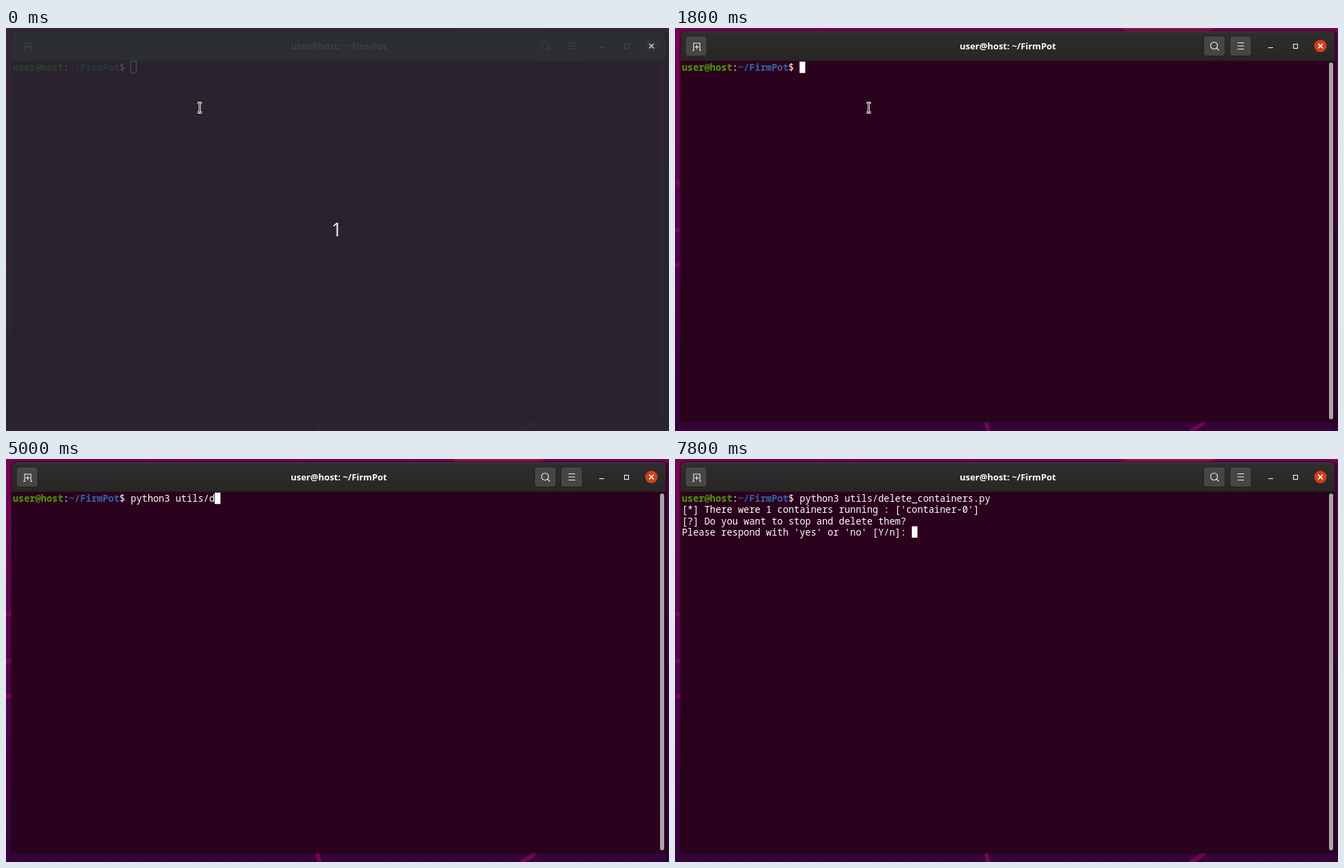
An HTML page for the animation above (8 s loop, 960 by 584 pixels).

```html
<!DOCTYPE html>
<html lang="en">
<head>
<meta charset="utf-8">
<title>Terminal</title>
<style>
html, body { margin: 0; width: 100%; height: 100%; overflow: hidden; background: #3a0440; }
svg { display: block; width: 960px; height: 584px; }
.term { font: 13.545px "Noto Sans Mono", "DejaVu Sans Mono", monospace; fill: #fff; white-space: pre; }
.term .user { fill: #4e9a06; font-weight: bold; }
.term .path { fill: #3465a4; font-weight: bold; }
.title { font: bold 12.9px "Noto Sans", "Open Sans", sans-serif; text-anchor: middle; }
.count { font: 27px "Noto Sans", "Open Sans", sans-serif; text-anchor: middle; fill: #e4e2e6; }
</style>
</head>
<body>
<svg viewBox="0 0 960 584">
  <defs>
    <linearGradient id="desk" x1="0" y1="0" x2="0" y2="1">
      <stop offset="0" stop-color="#72084f"/>
      <stop offset=".5" stop-color="#54044c"/>
      <stop offset="1" stop-color="#340339"/>
    </linearGradient>
    <linearGradient id="bar" x1="0" y1="0" x2="0" y2="1">
      <stop offset="0" stop-color="#302f2d"/>
      <stop offset="1" stop-color="#272624"/>
    </linearGradient>
    <g id="icons" fill="none" stroke="currentColor" stroke-width="1.1">
      <path d="M25 32.5h2v-10.500h9v10.500h2M31.500 24.500v6M28.500 27.500h6"/>
      <circle cx="780.500" cy="25.500" r="5"/>
      <path d="M784 29l3.500 3.500M814.500 21.500h9.500M814.500 26h9.500M814.500 30.500h9.500"/>
      <path d="M859 28.500h7"/>
      <rect x="895.500" y="23.500" width="6" height="6"/>
    </g>
    <path id="cross" d="M931.300 22.800l6.600 6.600M937.900 22.800l-6.600 6.600" stroke-width="1.5"/>
  </defs>

  <rect width="960" height="584" fill="url(#desk)"/>
  <path d="M648 0h133l-8 6h-120z" fill="#8c1452"/>
  <g fill="none" stroke="#86085a" stroke-width="6" opacity=".7">
    <path d="M212 -1l-5 8M0 223l9 3M0 293h9M0 344l9 -1M451 569q0 8 3 16M768 569q-8 9 -22 15"/>
    <path d="M262 -1l-8 8M434 -1l-10 8M587 -1l-2 8M607 -1l-3 8" stroke-width="2"/>
  </g>
  <path d="M8 571V12q0 -8 8 -8H948q8 0 8 8V571z" fill="none" stroke="#100010" stroke-opacity=".3" stroke-width="3"/>
  <rect x="955" width="5" height="584" y="6" fill="#1d0524" opacity=".45"/>

  <g id="blurred"></g>
  <g id="focused"></g>

  <text class="term" x="10" y="62"><tspan class="user">user@host</tspan>:<tspan class="path">~/FirmPot</tspan>$ <tspan id="typed"></tspan></text>
  <g id="output"></g>
  <rect id="cursor" width="8.200" height="16.500"/>

  <g id="countdown">
    <rect width="960" height="584" fill="rgb(40,44,48)" opacity=".81"/>
    <use href="#cross" stroke="#c4c4c4"/>
    <text class="count" x="479" y="301.500">1</text>
  </g>

  <g id="pointer" fill="none">
    <path id="beam" d="M277.500 108.500h2l1 1 1 -1h2M280.500 109v13M277.500 122.500h2l1 -1 1 1h2" stroke="#f4f4f4" stroke-width="3"/>
    <use href="#beam"/>
    <path d="M277.500 108.500h2l1 1 1 -1h2M280.500 109v13M277.500 122.500h2l1 -1 1 1h2" stroke="#111" stroke-width="1"/>
  </g>
</svg>
<script>
const LOOP = 8000, LEFT = 10, TOP = 49, COL = 8.127, ROW = 16.27, PROMPT = 21;
const $ = id => document.getElementById(id);
const command = 'python3 utils/delete_containers.py ';
const lines = [
  "[*] There were 1 containers running : ['container-0']",
  '[?] Do you want to stop and delete them?',
  "Please respond with 'yes' or 'no' [Y/n]: "
];

// [time, characters typed so far]
const keys = [[0, 0], [1900, 1], [2100, 2], [2300, 4], [2500, 5], [2600, 6], [2700, 7],
  [3000, 8], [3300, 9], [3700, 11], [3900, 14], [5000, 15], [5300, 17], [5500, 18], [6000, 35]];
// spans in which the blinking cursor is hidden
const blinks = [[1200, 1800], [4500, 4800], [6100, 6600], [7200, 7800]];
const focus = [[0, 0], [900, 0.6], [1000, 0.95], [1100, 1]];

const at = (track, t) => track.filter(step => step[0] <= t).pop()[1];
const show = (id, on) => $(id).setAttribute('display', on ? 'inline' : 'none');

function chrome(c) {
  const button = x => `<rect x="${x}" y="11.500" width="31" height="29" rx="3.500" fill="${c.button}" stroke="${c.edge}"/>`;
  return `<path d="M9 48V13q0 -8 8 -8H947q8 0 8 8V48z" fill="${c.bar}"/>
    <path d="M15 5.500H949" stroke="${c.shine}"/>
    <rect x="9" y="47" width="946" height="523" fill="${c.back}"/>
    <path d="M9 47.500H955" stroke="${c.line}"/>
    <path d="M8.500 47V570.500H955.500V47" fill="none" stroke="#22091f"/>
    <rect x="947" y="50" width="6" height="517" rx="3" fill="${c.scroll}"/>
    ${[15, 765.5, 803.5].map(button).join('')}
    <use href="#icons" color="${c.icon}"/>
    <circle cx="934.600" cy="26.100" r="9" fill="${c.close}"/>
    <use href="#cross" stroke="#fff"/>
    <text class="title" x="482" y="31" fill="${c.title}">user@host: ~/FirmPot</text>`;
}

$('blurred').innerHTML = chrome({
  bar: '#3c3b39', shine: '#494846', back: '#330225', line: '#292826', scroll: '#3d1231',
  button: '#3d3c3a', edge: '#2c2b29', icon: '#b4b3b0', close: '#5b5a57', title: '#9c9b98'
});
$('focused').innerHTML = chrome({
  bar: 'url(#bar)', shine: '#3c3b39', back: '#2b021e', line: '#1b1a18', scroll: '#aaa3a7',
  button: '#474644', edge: '#21201e', icon: '#f4f4f2', close: '#d04019', title: '#fff'
});
$('output').innerHTML = lines.map((s, i) =>
  `<text class="term" x="${LEFT}" y="${62 + (i + 1) * ROW}">${s}</text>`).join('');

function draw(t) {
  const typed = at(keys, t), done = t >= 7000, active = t >= 900;
  const col = done ? lines[2].length : PROMPT + typed;
  const cursor = $('cursor');
  $('focused').setAttribute('opacity', at(focus, t));
  $('typed').textContent = command.slice(0, typed);
  cursor.setAttribute('x', LEFT + col * COL - (active ? 0.3 : 0.2));
  cursor.setAttribute('y', TOP + (done ? 3 * ROW : 0) - (active ? 0.3 : 0.5));
  cursor.setAttribute('fill', active ? '#fff' : 'none');
  cursor.setAttribute('stroke', active ? 'none' : '#fff');
  show('cursor', !blinks.some(([from, to]) => t >= from && t < to));
  show('output', done);
  show('countdown', t < 500);
  show('pointer', t < 1900);
}

const start = performance.now();
function tick() {
  draw((performance.now() - start) % LOOP);
  requestAnimationFrame(tick);
}
tick();
</script>
</body>
</html>
```
